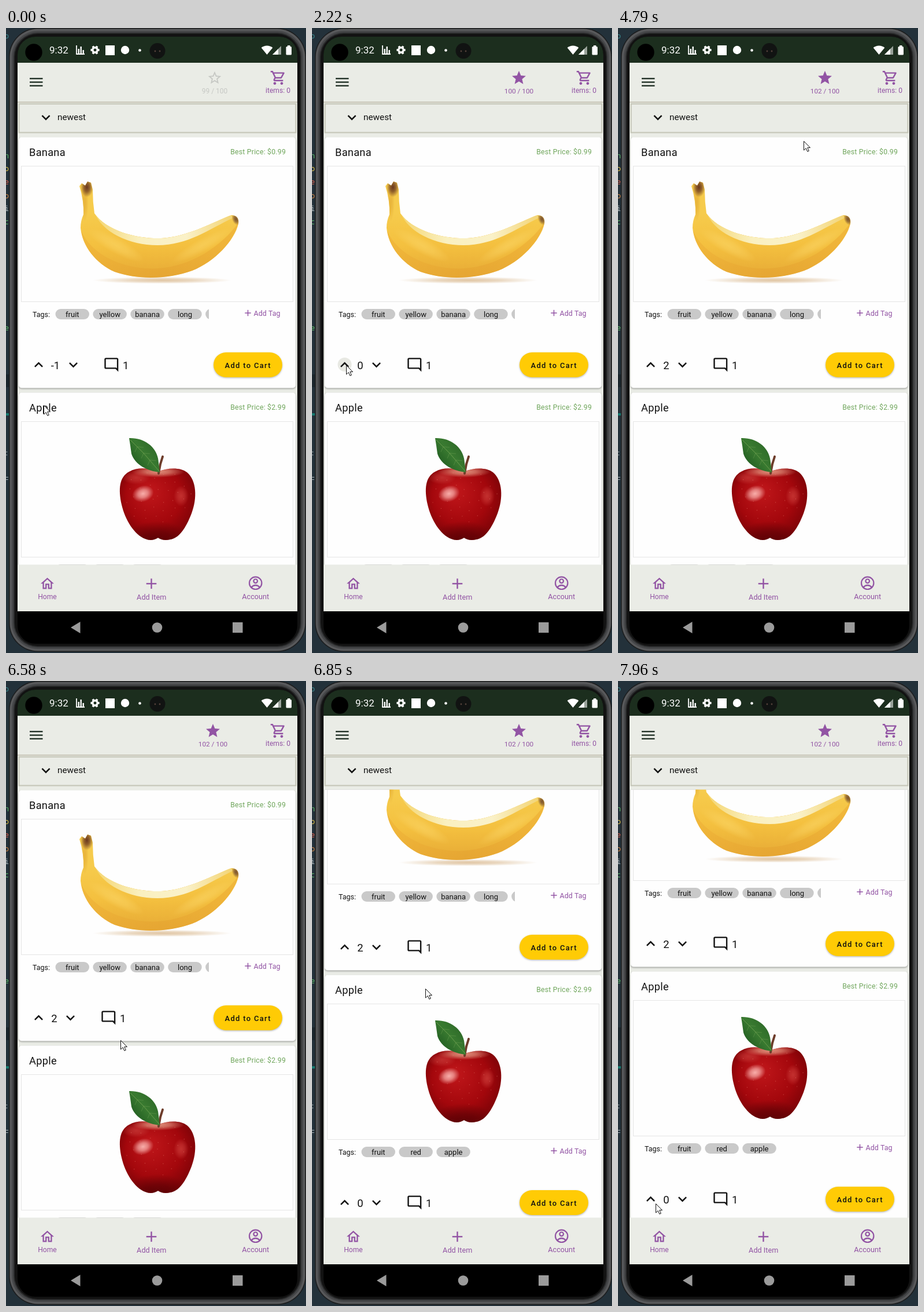
An HTML page with a canvas for the animation above (8 s loop, 519x1079 px).

```html
<!DOCTYPE html>
<html lang="en">
<head>
<meta charset="utf-8">
<title>Grocery list</title>
<style>
html, body { margin: 0; width: 100%; height: 100%; overflow: hidden; background: #23313a; }
canvas { display: block; width: 519px; height: 1079px; }
</style>
</head>
<body>
<canvas id="stage"></canvas>
<script>
const W = 519, H = 1079, LOOP = 8000;
const canvas = document.getElementById('stage');
const ratio = window.devicePixelRatio || 1;
canvas.width = W * ratio;
canvas.height = H * ratio;
const c = canvas.getContext('2d');

const PURPLE = '#9254a4', PAGE = '#eaece6', INK = '#111', GREEN = '#70a65c';

// Material style glyphs on a 24 unit grid
const ICON = {
  home: 'M12 5.69l5 4.5V18h-2v-6H9v6H7v-7.81l5-4.5M12 3L2 12h3v8h6v-6h2v6h6v-8h3L12 3z',
  star: 'M12 17.27L18.18 21l-1.64-7.03L22 9.24l-7.19-.61L12 2 9.19 8.63 2 9.24l5.46 4.73L5.82 21z',
  starLine: 'M22 9.24l-7.19-.62L12 2 9.19 8.63 2 9.24l5.46 4.73L5.82 21 12 17.27 18.18 21l-1.63-7.03L22 9.24zM12 15.4l-3.76 2.27 1-4.28-3.32-2.88 4.38-.38L12 6.1l1.71 4.04 4.38.38-3.32 2.88 1 4.28L12 15.4z',
  cart: 'M15.55 13c.75 0 1.41-.41 1.75-1.03l3.58-6.49c.37-.66-.11-1.48-.87-1.48H5.21l-.94-2H1v2h2l3.6 7.59-1.35 2.44C4.52 15.37 5.48 17 7 17h12v-2H7l1.1-2h7.45zM6.16 6h12.15l-2.76 5H8.53L6.16 6zM7 18c-1.1 0-1.99.9-1.99 2S5.9 22 7 22s2-.9 2-2-.9-2-2-2zm10 0c-1.1 0-1.99.9-1.99 2s.89 2 1.99 2 2-.9 2-2-.9-2-2-2z',
  comment: 'M20 17.17L18.83 16H4V4h16v13.17zM20 2H4c-1.1 0-2 .9-2 2v12c0 1.1.9 2 2 2h14l4 4V4c0-1.1-.9-2-2-2z'
};
for (const k in ICON) ICON[k] = new Path2D(ICON[k]);

// Shapes of the two fruits
const BANANA = new Path2D('M127 273L131 268L137 272L141 265L147 267L150 279Q150 300 153 320C174 350 225 364 268 363C315 361 362 333 390 323Q404 324 402 338C396 366 361 404 322 419C280 434 228 435 188 421C156 407 132 377 129 345Q129 333 134 322Q135 298 127 273Z');
const BANANA_TOP = new Path2D('M154 320C174 350 225 364 268 363C315 361 362 333 390 323L392 328C352 347 315 375 262 375C213 375 166 352 154 320Z');
const BANANA_LOW = new Path2D('M130 350C150 396 210 418 262 415C320 412 374 376 402 336C396 366 361 404 322 419C280 434 228 435 188 421C156 407 132 377 130 350Z');
const APPLE = new Path2D('M262 766C280 759 301 758 313 767C330 781 331 812 321 838C311 864 299 881 284 883Q272 886 263 880Q252 887 241 882C222 875 206 849 200 823C194 796 196 775 213 766C228 758 246 759 262 766Z');
const LEAF = new Path2D('M213 708C238 707 259 722 263 743Q265 757 266 767C245 765 223 754 217 735Q215 720 213 708Z');
const ARROW = new Path2D('M.5 .5V16L4.2 12.5L6.8 18.3L9.3 17.2L6.8 11.6H11.5Z');

// time, x, y of the pointer tip
const POINTER = [
  [0, 65, 651], [120, 64, 628], [270, 60, 606], [390, 58, 588], [1200, 58, 588],
  [1350, 72, 599], [1470, 88, 607], [1590, 98, 604], [1710, 86, 598], [1830, 68, 588], [1950, 59, 582],
  [4640, 309, 228], [4790, 321, 195], [4940, 337, 152], [5060, 351, 120], [5210, 359, 88],
  [5770, 342, 190], [5890, 297, 331], [6040, 249, 586], [6190, 226, 642], [6310, 209, 660],
  [6460, 204, 667], [6580, 198, 620], [6730, 197, 575], [6850, 196, 531], [7000, 193, 540],
  [7150, 144, 726], [7300, 118, 806], [7420, 97, 868], [7540, 82, 899], [7690, 68, 906],
  [7840, 66, 904], [7960, 65, 902]
];
const SCROLL = [[0, 0], [6730, 60], [6850, 122], [7000, 128]];
const VOTES = [[0, -1], [2220, 0], [3450, 1], [4370, 2]];
const RIPPLE = [[0, 0], [2220, 12], [2340, 28], [2490, 0], [3450, 15.5], [3570, 28], [3690, 0], [4370, 10], [4520, 28], [4640, 0]];

const at = (keys, t) => keys.filter(k => k[0] <= t).pop();

function text(s, x, y, size, color = INK, align = 'left', weight = 400, gap = 0) {
  c.font = `${weight} ${size}px Roboto, sans-serif`;
  c.letterSpacing = gap + 'px';
  c.textAlign = align;
  c.fillStyle = color;
  c.fillText(s, x, y);
}
function rect(x, y, w, h, color) {
  c.fillStyle = color;
  c.fillRect(x, y, w, h);
}
function box(x, y, w, h, r, color) {
  c.fillStyle = color;
  c.beginPath();
  c.roundRect(x, y, w, h, r);
  c.fill();
}
function disc(x, y, r, color) {
  c.fillStyle = color;
  c.beginPath();
  c.arc(x, y, r, 0, 7);
  c.fill();
}
function line(points, color, width) {
  c.strokeStyle = color;
  c.lineWidth = width;
  c.beginPath();
  points.forEach(([x, y]) => c.lineTo(x, y));
  c.stroke();
}
function poly(points, color) {
  c.fillStyle = color;
  c.beginPath();
  points.forEach(([x, y]) => c.lineTo(x, y));
  c.fill();
}
function icon(name, x, y, scale, color) {
  c.save();
  c.translate(x - 12 * scale, y - 12 * scale);
  c.scale(scale, scale);
  c.fillStyle = color;
  c.fill(ICON[name], 'evenodd');
  c.restore();
}
function chevron(x, y, dir) {
  line([[x - 6.6, y - 3.4 * dir], [x, y + 3.2 * dir], [x + 6.6, y - 3.4 * dir]], INK, 2.5);
}
function plus(x, y, r, width) {
  line([[x - r, y], [x + r, y]], PURPLE, width);
  line([[x, y - r], [x, y + r]], PURPLE, width);
}
function shadow(color, blur, dy) {
  c.shadowColor = color;
  c.shadowBlur = blur * ratio;
  c.shadowOffsetY = dy * ratio;
}
const noShadow = () => shadow('transparent', 0, 0);
function linear(x0, y0, x1, y1, ...colors) {
  const g = c.createLinearGradient(x0, y0, x1, y1);
  colors.forEach((col, i) => g.addColorStop(i / (colors.length - 1), col));
  return g;
}
// soft elliptical spot
function glow(x, y, rx, ry, rgb, alpha, turn = 0) {
  c.save();
  c.translate(x, y);
  c.rotate(turn);
  c.scale(rx, ry);
  const g = c.createRadialGradient(0, 0, 0, 0, 0, 1);
  g.addColorStop(0, `rgba(${rgb},${alpha})`);
  g.addColorStop(.45, `rgba(${rgb},${alpha * .7})`);
  g.addColorStop(1, `rgba(${rgb},0)`);
  disc(0, 0, 1, g);
  c.restore();
}

function desktop() {
  rect(0, 0, W, H, '#23313a');
  rect(0, 598, 6, 22, '#1a252c');
  rect(0, 665, 6, 4, '#167a70');
  const code = [['co', 18, '#3a8f95'], ['n', 225, '#5fbf6a'], ['o', 247, '#e8c84a'], ['e', 270, '#e0604c'],
    ['o', 294, '#dd8a45'], ['ai', 316, '#aab4ba'], ['c', 339, '#5fbf6a'], ['e', 522, '#5fbf6a'],
    ['e:', 738, '#aab4ba'], ['F', 784, '#aab4ba']];
  c.textAlign = 'right';
  c.letterSpacing = '0px';
  c.font = '12px "Noto Sans Mono", monospace';
  code.forEach(([s, y, color]) => { c.fillStyle = color; c.fillText(s, 5, y); });
}

function phone() {
  const rim = (inset, color) =>
    box(5 + inset, inset, 514 - 2 * inset, 1077 - 2 * inset, 50 - inset, color);
  rim(0, '#1b1c1d');
  rim(1.5, '#58595b');
  rim(5, '#454648');
  rim(8, '#2b2c2d');
  rim(10, '#121212');
  box(20, 15, 484, 1048, 31, '#000');
}

function statusBar() {
  c.save();
  c.beginPath();
  c.roundRect(20, 15, 484, 60, [31, 31, 0, 0]);
  c.clip();
  rect(20, 15, 484, 46, '#1c2e1e');
  c.restore();
  disc(48, 42, 14.7, '#000');
  text('9:32', 75, 44, 17, '#fff');
  line([[122, 30], [122, 45], [136, 45]], '#fff', 1.8);
  [[125, 36], [129, 32], [133, 38]].forEach(([x, y]) => rect(x - .5, y, 2.4, 45 - y, '#fff'));
  c.strokeStyle = '#fff';
  c.lineWidth = 3.4;
  c.beginPath();
  c.arc(154, 38, 4.2, 0, 7);
  c.stroke();
  for (let i = 0; i < 6; i++) {
    const a = i * Math.PI / 3, p = r => [154 + r * Math.cos(a), 38 + r * Math.sin(a)];
    line([p(5), p(7.6)], '#fff', 3.6);
  }
  rect(172, 30, 16, 17, '#fff');
  disc(206, 38, 7.2, '#fff');
  disc(231.5, 38.5, 2.3, '#fff');
  disc(262, 39.5, 13.5, '#111312');
  disc(258, 40, 1.4, '#53413a');
  disc(266, 40, 1.4, '#53413a');
  c.fillStyle = '#fff';
  c.beginPath();
  c.moveTo(451.5, 46);
  c.arc(451.5, 46, 15.5, -Math.PI * .72, -Math.PI * .28);
  c.fill();
  poly([[476, 31], [476, 46], [461, 46]], '#9aa39b');
  poly([[471, 36], [471, 46], [461, 46]], '#fff');
  box(484.5, 32, 9.5, 14.5, 1.5, '#fff');
  rect(487, 30, 4.5, 3, '#fff');
}

function header(votes) {
  rect(20, 60, 484, 67, PAGE);
  rect(20, 127, 484, 2, '#c9c6b8');
  [-1, 0, 1].forEach(i => rect(41, 92.4 + i * 6.2, 22.5, 2.2, '#14251a'));
  if (votes < 0) {
    icon('starLine', 361, 86, 1.13, '#c6c8c4');
    text('99 / 100', 361, 113, 12, '#c6c8c4', 'center');
  } else {
    icon('star', 358, 86, 1.2, PURPLE);
    text(`${100 + votes} / 100`, 358, 113, 11.8, PURPLE, 'center');
  }
  icon('cart', 471, 86, 1.2, PURPLE);
  text('items: 0', 470.5, 112, 12.1, PURPLE, 'center');
  rect(20, 129, 484, 56, PAGE);
  c.strokeStyle = '#c7c8ba';
  c.lineWidth = 2.2;
  c.strokeRect(22.5, 131, 479, 49.5);
  chevron(69, 154.5, 1);
  text('newest', 89, 159, 15.3);
}

function banana() {
  glow(270, 435.5, 120, 6, '215,180,135', .75);
  c.fillStyle = linear(0, 320, 0, 432, '#f6cb4c', '#f4c03f', '#e6a935');
  c.fill(BANANA);
  c.save();
  c.clip(BANANA);
  c.fillStyle = linear(130, 0, 402, 0, '#eeb036', '#e5a230', '#ecab33');
  c.globalAlpha = .55;
  c.fill(BANANA_LOW);
  c.globalAlpha = 1;
  c.fillStyle = linear(154, 0, 390, 0, '#f4d672', '#faf0c0', '#faf1c8', '#f3d577');
  c.fill(BANANA_TOP);
  glow(190, 375, 55, 14, '250,212,100', .6, .5);
  glow(340, 375, 60, 12, '250,214,105', .5, -.5);
  glow(136, 300, 7, 34, '226,170,50', .7);
  glow(140, 275, 11, 17, '105,55,30', 1);
  glow(398, 330, 7, 11, '115,75,45', .95, -.4);
  c.restore();
}

function apple() {
  const g = c.createRadialGradient(248, 800, 10, 262, 814, 80);
  g.addColorStop(0, '#bb1418');
  g.addColorStop(.55, '#a3070c');
  g.addColorStop(1, '#720206');
  c.fillStyle = g;
  c.fill(APPLE);
  c.save();
  c.clip(APPLE);
  glow(263, 766, 46, 10, '232,165,140', .85);
  glow(225, 776, 24, 12, '214,80,75', .5);
  glow(262, 885, 58, 34, '70,0,3', .6);
  glow(237, 804, 19, 14, '255,190,185', .9, -.3);
  glow(303, 808, 13, 18, '215,75,70', .6);
  for (let i = 0; i < 36; i++) {
    const a = i * 2.4, r = 10 * Math.sqrt(i);
    disc(262 + r * Math.cos(a), 808 + r * .8 * Math.sin(a), .7, 'rgba(240,150,130,.4)');
  }
  c.restore();
  c.lineCap = 'round';
  line([[264, 769], [267, 753], [271, 740]], '#6e3d2b', 4);
  c.lineCap = 'butt';
  c.fillStyle = linear(215, 750, 260, 715, '#1f5a20', '#397a30', '#2b6627');
  c.fill(LEAF);
  line([[215, 711], [238, 734], [265, 765]], '#6a9b4d', 1);
  [[227, 723], [238, 734], [249, 746]].forEach(([x, y]) =>
    line([[x - 4, y + 9], [x, y], [x + 11, y + 1]], 'rgba(120,165,90,.5)', .8));
}

function card(item) {
  const { name, price, tags, votes, draw, dy, ripple } = item;
  c.save();
  c.translate(0, dy);
  shadow('rgba(0,0,0,.32)', 3, 1.5);
  box(22, 188.5, 479, 433, 5, '#fefefe');
  noShadow();
  text(name, 40, 220.7, 18.2, INK, 'left', 400, .3);
  text('Best Price: ' + price, 484, 218.3, 12.3, GREEN, 'right', 400, .2);
  c.strokeStyle = '#e5e5e5';
  c.lineWidth = 1;
  c.strokeRect(26.5, 238.5, 470, 234);
  text('Tags:', 46, 498.5, 12.5);
  c.save();
  c.beginPath();
  c.rect(85, 480, 266, 30);
  c.clip();
  tags.forEach((tag, i) => {
    const x = 85.5 + i * 64.9;
    box(x, 485, 58.5, 18, 9, '#c9c9c9');
    text(tag, x + 29.3, 498.7, 13, INK, 'center');
  });
  c.restore();
  plus(418.5, 492, 5.2, 1.5);
  text('Add Tag', 474.5, 497, 12.5, PURPLE, 'right');
  if (ripple) disc(56.5, 581, ripple, '#e8e9e3');
  const shift = votes < 0 ? 5 : 0;
  chevron(56.5, 581.5, -1);
  text(votes, shift ? 85.5 : 83.5, 588.5, 18.5, INK, 'center');
  chevron(111.5 + shift, 581.5, 1);
  icon('comment', 177.3 + shift, 581.4, 1.2, INK);
  text('1', 202.3 + shift, 588.5, 18.5, INK, 'center');
  shadow('rgba(0,0,0,.28)', 3, 1.2);
  box(359, 560, 119, 43, 21.5, '#ffcb05');
  noShadow();
  text('Add to Cart', 378.5, 586.7, 13, INK, 'left', 500, 1.3);
  c.restore();
  draw();
}

function list(votes, scroll, ripple) {
  rect(20, 183, 484, 744, PAGE);
  c.save();
  c.beginPath();
  c.rect(20, 187.5, 484, 739.5);
  c.clip();
  c.translate(0, -scroll);
  card({ name: 'Banana', price: '$0.99', tags: ['fruit', 'yellow', 'banana', 'long', ''], votes, draw: banana, dy: 0, ripple });
  card({ name: 'Apple', price: '$2.99', tags: ['fruit', 'red', 'apple'], votes: 0, draw: apple, dy: 441 });
  c.restore();
}

function footer() {
  rect(20, 926.5, 484, 80.5, PAGE);
  icon('home', 71.5, 959.3, 1.15, PURPLE);
  text('Home', 71.5, 986, 12.1, PURPLE, 'center');
  plus(251.5, 959.3, 8.8, 2.4);
  text('Add Item', 251.7, 987, 12.7, PURPLE, 'center');
  c.strokeStyle = PURPLE;
  c.lineWidth = 2.2;
  c.beginPath();
  c.arc(431.7, 958.3, 10.7, 0, 7);
  c.stroke();
  c.beginPath();
  c.arc(431.7, 954.8, 3.3, 0, 7);
  c.stroke();
  c.beginPath();
  c.moveTo(424.2, 965.6);
  c.quadraticCurveTo(431.7, 958.4, 439.2, 965.6);
  c.stroke();
  text('Account', 431.7, 986, 12.7, PURPLE, 'center');
  poly([[112, 1035], [128.5, 1025], [128.5, 1045]], '#9b9b9b');
  disc(261.5, 1035, 8.8, '#9b9b9b');
  rect(392, 1026, 17.5, 18, '#9b9b9b');
}

function pointer(x, y) {
  c.save();
  c.translate(x, y);
  c.fillStyle = '#fff';
  c.fill(ARROW);
  c.strokeStyle = '#111';
  c.lineWidth = 1;
  c.stroke(ARROW);
  c.restore();
}

function frame(now) {
  const t = now % LOOP;
  const votes = at(VOTES, t)[1];
  const [, x, y] = at(POINTER, t);
  c.setTransform(ratio, 0, 0, ratio, 0, 0);
  desktop();
  phone();
  statusBar();
  list(votes, at(SCROLL, t)[1], at(RIPPLE, t)[1]);
  header(votes);
  footer();
  pointer(x, y);
}

const start = performance.now();
function tick() {
  frame(performance.now() - start);
  requestAnimationFrame(tick);
}
tick();
</script>
</body>
</html>
```
